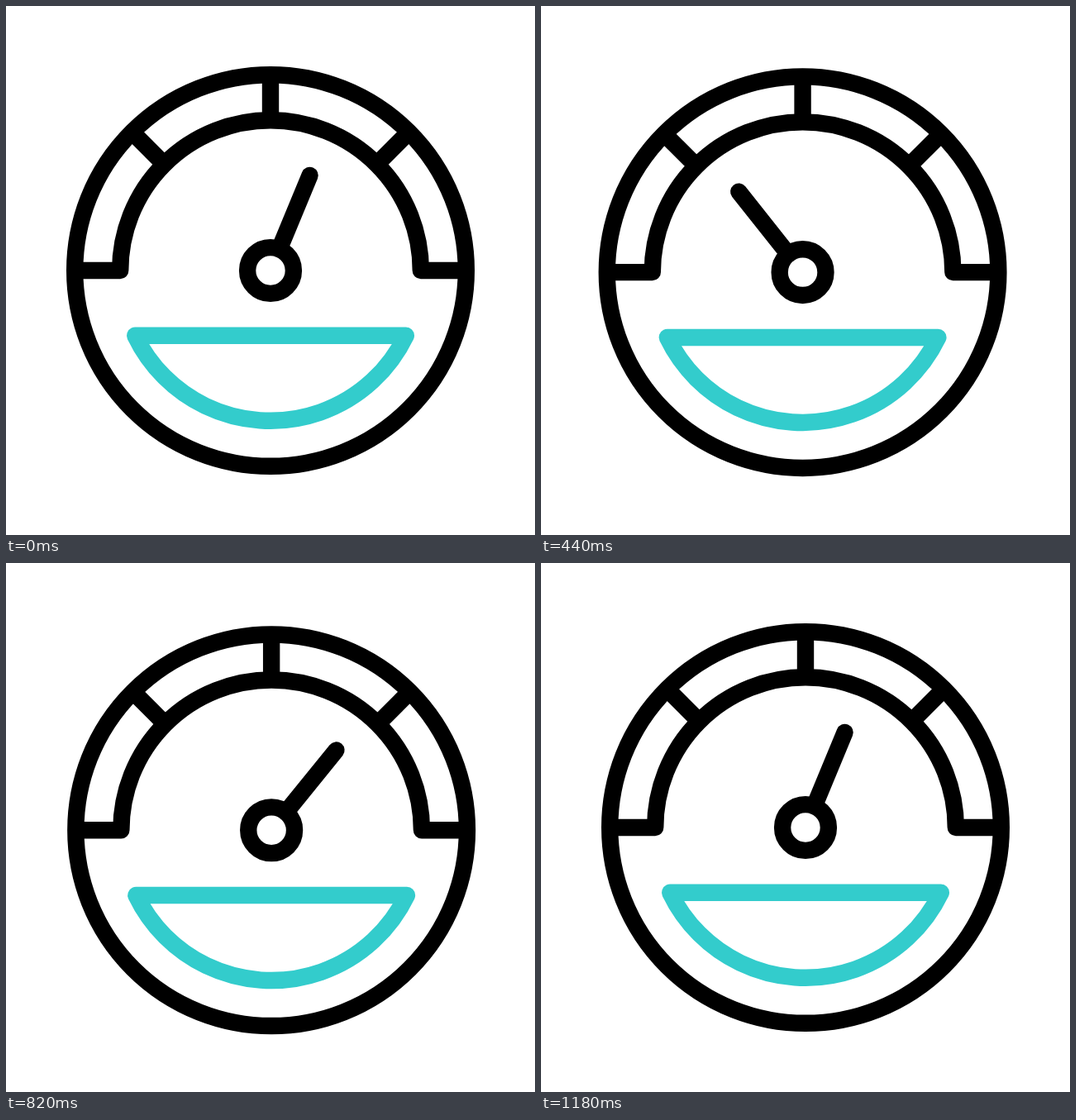
Animation, 640 px wide and 640 px high, one loop 1.2 s. Source, as an HTML page with a canvas:

```html
<!DOCTYPE html>
<html lang="en">
<head>
<meta charset="utf-8">
<title>Gauge</title>
<style>
  html, body { margin: 0; width: 100%; height: 100%; overflow: hidden; background: #fff; }
  canvas { display: block; width: 100vw; height: 100vh; }
</style>
</head>
<body>
<canvas id="stage" width="640" height="640"></canvas>
<script>
const ctx = document.getElementById('stage').getContext('2d');
const LOOP = 1200, STEP = 20;
const RIM = 236.8, DIAL = 181.8, HUB = 27.9, NEEDLE = 124.4;
const BOWL_ANGLE = Math.asin(78.8 / DIAL);
const REST = 22.45;
const rad = deg => deg * Math.PI / 180;

const smooth = u => u * u * (3 - 2 * u);
const soft = u => (u + smooth(u)) / 2;
const settle = u => 1 - (1 - u) ** 2.5;

// Eases from turning point to turning point, then holds the last value.
function swing(t, from, ...moves) {
  let begin = 0;
  for (const [end, to, ease] of moves) {
    if (t < end) return from + (to - from) * ease((t - begin) / (end - begin));
    [begin, from] = [end, to];
  }
  return from;
}

const shakeX = t => swing(t, 0,
  [335, -6.5, smooth], [682, 5.3, soft], [1045, -6.5, soft], [1180, 0, soft]);
const shakeY = t => swing(t, 0,
  [130, -2.4, soft], [480, 2.5, soft], [600, 1.2, soft], [900, 3.8, soft], [1140, 0, soft]);
const needleAngle = t => swing(t, REST,
  [470, -38.5, settle], [800, 40, smooth], [950, 19.4, smooth], [1180, REST, smooth]);

function ring(radius) {
  ctx.beginPath();
  ctx.arc(0, 0, radius, 0, 2 * Math.PI);
  ctx.stroke();
}

function spoke(deg, from, to, cap = 'butt') {
  const s = Math.sin(rad(deg)), c = -Math.cos(rad(deg));
  ctx.lineCap = cap;
  ctx.beginPath();
  ctx.moveTo(from * s, from * c);
  ctx.lineTo(to * s, to * c);
  ctx.stroke();
}

function draw(t) {
  ctx.setTransform(1, 0, 0, 1, 0, 0);
  ctx.fillStyle = '#fff';
  ctx.fillRect(0, 0, 640, 640);
  ctx.translate(320 + shakeX(t), 320 + shakeY(t));
  ctx.lineWidth = 20.4;
  ctx.lineJoin = 'round';

  ctx.strokeStyle = '#33cccc';
  ctx.beginPath();
  ctx.arc(0, 0, DIAL, BOWL_ANGLE, Math.PI - BOWL_ANGLE);
  ctx.closePath();
  ctx.stroke();

  ctx.strokeStyle = '#000';
  ctx.lineCap = 'butt';
  ring(RIM);
  ring(HUB);
  ctx.beginPath();
  ctx.moveTo(-RIM, 0);
  ctx.arc(0, 0, DIAL, Math.PI, 2 * Math.PI);
  ctx.lineTo(RIM, 0);
  ctx.stroke();
  for (const deg of [-45, 0, 45]) spoke(deg, DIAL, RIM);
  spoke(needleAngle(t), HUB, NEEDLE, 'round');
}

const start = performance.now();
function frame() {
  const t = (performance.now() - start) % LOOP;
  draw(Math.floor(t / STEP) * STEP);
  requestAnimationFrame(frame);
}
frame();
</script>
</body>
</html>
```
